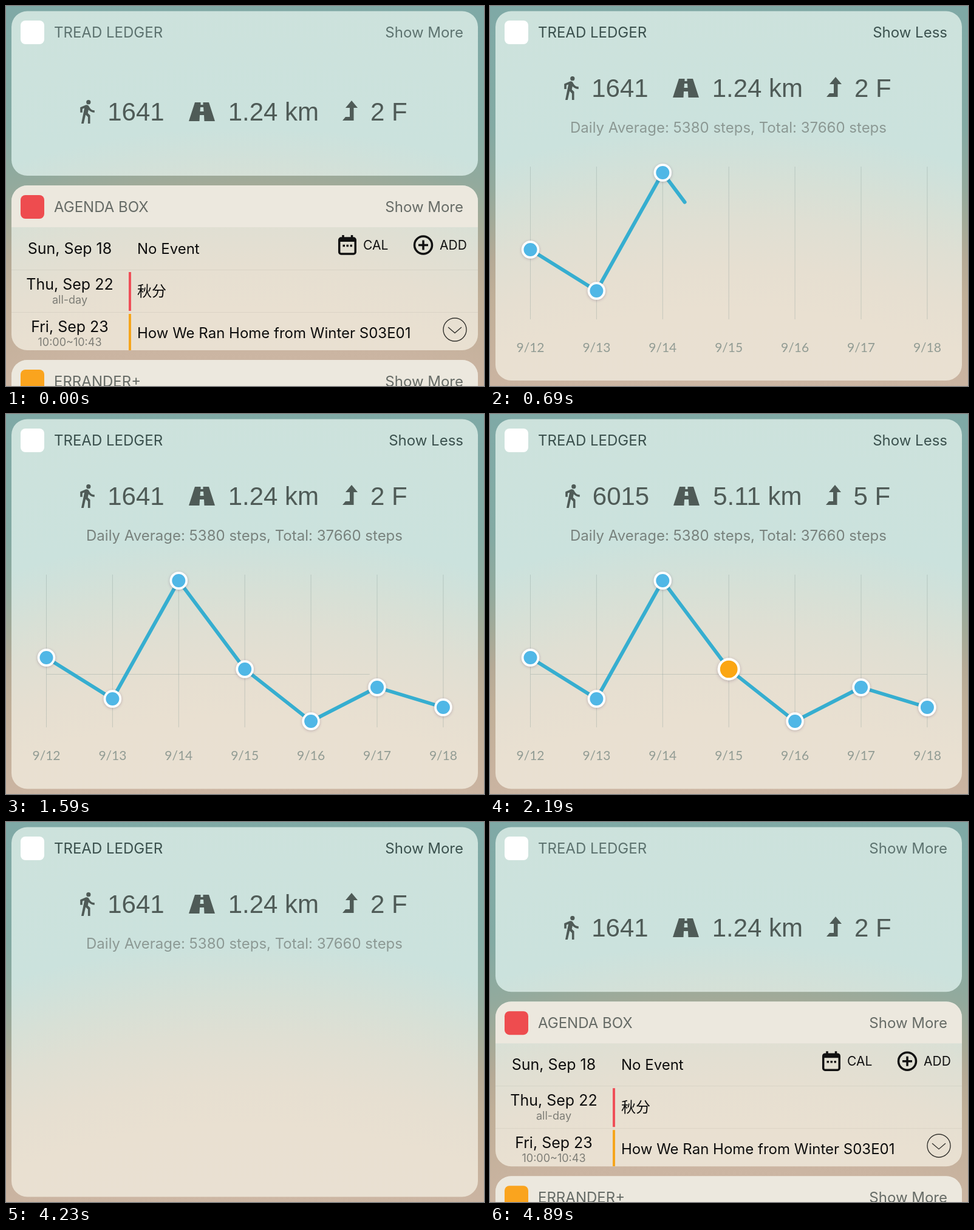
An HTML page that plays this animation: 787 px wide and 627 px high, repeating every 4950 ms.

```html
<!DOCTYPE html>
<html lang="en">
<head>
<meta charset="utf-8">
<title>Step counter widget</title>
<style>
  html, body { margin: 0; width: 100%; height: 100%; overflow: hidden; }
  body {
    position: relative;
    background: radial-gradient(circle at 394px 1500px,
      #cdb7a4 873px, #cab4a1 960px, #c0af98 1090px, #b5aa96 1150px,
      #a3aa98 1206px, #93aa9d 1263px, #83aaa3 1358px, #7fa9a6 1551px);
  }
  svg { display: block; }
  #stage { position: absolute; left: 0; top: 0; }
  text { font: 400 24px Inter, sans-serif; }
  .end { text-anchor: end; }
  .mid { text-anchor: middle; }
  .head { fill: #3a504d; }
  .other { fill: #666b66; }
  .event { fill: #0d0d0d; }
  .date { font-size: 25px; }
  .small { font-size: 18px; fill: #7d7d76; }
  .button { font-size: 21px; fill: #111; }
  .average { fill: #78827d; }
  .day { font: 400 21px Lato, sans-serif; fill: #929c94; }
  .grid { stroke: #8d9d98; stroke-opacity: .38; fill: none; }
  #stats {
    position: absolute; left: 0; top: 149.5px; width: 782px; height: 50px;
    display: flex; justify-content: center; align-items: center;
    font: 42px/50px "Liberation Sans", Arial, sans-serif;
    color: #4f5b57; white-space: pre;
  }
  #stats svg { fill: currentColor; flex: none; }
</style>
</head>
<body>
<svg id="stage" width="787" height="627" viewBox="0 0 787 627">
  <defs>
    <radialGradient id="frost" gradientUnits="userSpaceOnUse" cx="394" cy="1500" r="1551">
      <stop offset=".574" stop-color="#e9e0d2"/>
      <stop offset=".645" stop-color="#e9e0d1"/>
      <stop offset=".69" stop-color="#e6dfd1"/>
      <stop offset=".741" stop-color="#dfdfd3"/>
      <stop offset=".78" stop-color="#d7e0d6"/>
      <stop offset=".812" stop-color="#d0e1da"/>
      <stop offset=".838" stop-color="#cbe2dd"/>
      <stop offset="1" stop-color="#cde2dc"/>
    </radialGradient>
    <clipPath id="stepsClip"><rect class="steps" x="9" y="8.5" width="768" rx="26"/></clipPath>
    <clipPath id="cardsClip">
      <rect class="steps" x="9" y="8.5" width="768" rx="26"/>
      <rect class="below" x="9" y="296" width="768" height="272" rx="26"/>
      <rect class="below" x="9" y="584" width="768" height="272" rx="26"/>
    </clipPath>
    <filter id="shadow" x="-50%" y="-50%" width="200%" height="200%">
      <feDropShadow dx="0" dy="1" stdDeviation="2" flood-color="#435" flood-opacity=".3"/>
    </filter>
  </defs>

  <g clip-path="url(#cardsClip)">
    <rect width="787" height="627" fill="url(#frost)"/>
    <g class="below">
      <path d="M9 296H777V365H9zM9 584H777V653H9z" fill="#ece8de"/>
      <path d="M9 435.5H777M9 505.5H777" stroke="#000" stroke-opacity=".06"/>
      <rect x="202" y="439" width="4" height="64" fill="#ef4f58"/>
      <rect x="202" y="508" width="4" height="60" fill="#f5a51c"/>
    </g>
  </g>

  <g id="header">
    <text class="head" x="79" y="52">TREAD LEDGER</text>
    <text class="head end" id="toggle" x="753" y="52"></text>
  </g>
  <rect x="24" y="24" width="39" height="39" rx="8" fill="#fff"/>
  <g clip-path="url(#stepsClip)">
    <text id="average" class="average mid" x="392.5" y="209">Daily Average: 5380 steps, Total: 37660 steps</text>
    <g id="chart">
      <g id="days"></g>
      <path id="averageLine" class="grid"/>
      <path id="line" fill="none" stroke="#36aed0" stroke-width="6" stroke-linecap="round"
        stroke-linejoin="round" pathLength="1"/>
      <g id="dots"></g>
    </g>
  </g>

  <g class="below">
    <rect x="24" y="312" width="39" height="39" rx="8" fill="#ee4c4f"/>
    <text class="other" x="79" y="340">AGENDA BOX</text>
    <text class="other end" x="753" y="340">Show More</text>
    <g class="event">
      <text class="date mid" x="105" y="409">Sun, Sep 18</text>
      <text class="date mid" x="105" y="468">Thu, Sep 22</text>
      <text class="date mid" x="105" y="538">Fri, Sep 23</text>
      <text x="216" y="409">No Event</text>
      <text x="216" y="479" style="font-family:'Noto Sans CJK SC','Noto Sans CJK JP','Noto Sans CJK',sans-serif">秋分</text>
      <text x="216" y="548">How We Ran Home from Winter S03E01</text>
    </g>
    <text class="small mid" x="105" y="491">all-day</text>
    <text class="small mid" x="105" y="560.5">10:00~10:43</text>
    <g fill="none" stroke="#111" stroke-width="3.5">
      <rect x="548.7" y="383" width="26.5" height="26" rx="3"/>
      <path d="M548 386H576" stroke-width="6"/>
      <path d="M555 378V385M569.5 378V385"/>
      <path d="M554.5 395.5h3.500m2.500 0h3.500m2.500 0h3.500"/>
      <circle cx="687" cy="394.5" r="14.5"/>
      <path d="M679 394.5H695M687 386.5V402.5"/>
    </g>
    <text class="button" x="588" y="402">CAL</text>
    <text class="button" x="714" y="402">ADD</text>
    <g fill="none" stroke="#33322e" stroke-width="1.4">
      <circle cx="739" cy="534" r="19"/>
      <path d="M728 530L739 539.5L750 530"/>
    </g>
    <rect x="24" y="600" width="39" height="39" rx="8" fill="#faa41e"/>
    <text class="other" x="79" y="628">ERRANDER+</text>
    <text class="other end" x="753" y="628">Show More</text>
  </g>
</svg>

<div id="stats">
  <svg width="26" height="39" viewBox="6 1.5 13 21.5" style="margin-right:20px">
    <path d="M13.5 5.5a2 2 0 1 0 0-4a2 2 0 0 0 0 4zM9.8 8.9L7 23h2.100l1.800-8 2.100 2v6h2v-7.500l-2.100-2 .6-3C14.8 12 16.8 13 19 13v-2c-1.900 0-3.500-1-4.300-2.400l-1-1.600c-.4-.6-1-1-1.700-1-.3 0-.5.1-.8.1L6 8.3V13h2V9.6z"/>
  </svg>
  <span id="steps"></span>
  <svg width="43" height="31" style="margin:0 22px 0 40px">
    <path fill-rule="evenodd" d="M10 0H19.5V4H23.5V0H33L43 31H25.5L25 21H18L17.5 31H0zM19 8L18.5 15H24.5L24 8z"/>
  </svg>
  <span id="distance"></span>
  <svg width="26" height="33" style="margin:-4px 20px 0 39px">
    <path d="M15 0L25 12H18.5V33H0L5 27H12V12H5z"/>
  </svg>
  <span id="floors"></span>
</div>

<script>
const LOOP = 4950, EXPAND = 110, COLLAPSE = 4230, GROWTH = 338.5;
const DRAW = [259, 1211], AVERAGE = [1200, 1680], AVERAGE_Y = 429.5;
const pointY = [402, 470, 275, 421, 507, 451, 484];
const points = pointY.map((y, i) => [66.5 + i * 108.9, y]);
const TODAY = 6;
const stats = {
  2: ['16105', '11.69 km', '25 F'],
  3: ['6015', '5.11 km', '5 F'],
  [TODAY]: ['1641', '1.24 km', '2 F'],
};
// Taps on the chart: time and selected day (-1 clears the selection).
const taps = [[0, -1], [1980, 3], [2430, TODAY], [2970, 2], [3600, -1]];

const $ = id => document.getElementById(id);
const setAll = (selector, name, value) =>
  document.querySelectorAll(selector).forEach(node => node.setAttribute(name, value));
const clamp = v => Math.min(1, Math.max(0, v));
const ramp = (t, [from, to]) => clamp((t - from) / (to - from));
const easeOut = v => 1 - (1 - v) ** 3;
const spring = ms => ms <= 0 ? 0 : 1 - (1 + .015 * ms) * Math.exp(-.015 * ms);
const setText = (id, value) => { if ($(id).textContent !== value) $(id).textContent = value; };

$('days').innerHTML = points.map(([x], i) =>
  `<path class="grid" d="M${x} 265V517"/><text class="day mid" x="${x}" y="571">9/${12 + i}</text>`).join('');
$('dots').innerHTML = points.map(() =>
  `<g><circle r="14.7" fill="#fff" filter="url(#shadow)"/><circle r="11" fill="#50b7e6"/>
   <circle r="11.4" fill="#fba613"/></g>`).join('');
$('line').setAttribute('d', 'M' + points.join('L'));

// Length of the line up to each point.
const reached = [0];
for (let i = 1; i < points.length; i++) {
  const [[x0, y0], [x1, y1]] = [points[i - 1], points[i]];
  reached.push(reached[i - 1] + Math.hypot(x1 - x0, y1 - y0));
}
const total = reached[TODAY];

function drawChart(t) {
  const drawn = ramp(t, DRAW);
  const line = $('line').style;
  line.visibility = drawn > 0 ? 'visible' : 'hidden';
  line.strokeDasharray = `${drawn} 2`;
  const [[left], [right]] = [points[0], points[TODAY]];
  const across = left + (right - left) * ramp(t, AVERAGE);
  $('averageLine').setAttribute('d', `M${left} ${AVERAGE_Y}H${across}`);

  const step = taps.findLastIndex(([time]) => t >= time);
  const [time, selected] = taps[step];
  const previous = step ? taps[step - 1][1] : -1;
  const change = easeOut(clamp((t - time + 15) / 210));
  [...$('dots').children].forEach((dot, i) => {
    const [x, y] = points[i];
    const lift = i === selected ? change : i === previous ? 1 - change : 0;
    dot.setAttribute('transform', `translate(${x} ${y}) scale(${1 + .26 * lift})`);
    dot.style.display = drawn > 0 && drawn >= reached[i] / total ? '' : 'none';
    dot.lastElementChild.style.opacity = lift;
  });

  const values = stats[selected < 0 ? TODAY : selected];
  ['steps', 'distance', 'floors'].forEach((id, i) => setText(id, values[i]));
}

function draw(t) {
  const open = t < COLLAPSE ? spring(t - EXPAND) : 1 - spring(t - COLLAPSE);
  const expanded = t >= EXPAND && t < COLLAPSE - 5;
  setAll('.steps', 'height', 271.5 + GROWTH * open);
  setAll('.below', 'transform', `translate(0 ${GROWTH * open})`);
  $('header').style.opacity = .76 + .24 * open;
  setText('toggle', expanded ? 'Show Less' : 'Show More');

  $('stats').style.transform = `translateY(${-39 * open}px)`;
  $('average').setAttribute('transform', `translate(0 ${39 * (1 - open)})`);
  $('average').style.opacity = expanded
    ? ramp(t, [120, 870])
    : .76 * (t > EXPAND ? 1 - ramp(t, [COLLAPSE, COLLAPSE + 450]) : 0);
  $('chart').style.display = expanded ? '' : 'none';
  drawChart(t);
}

const start = performance.now();
function frame() {
  draw((performance.now() - start) % LOOP);
  requestAnimationFrame(frame);
}
frame();
</script>
</body>
</html>
```
